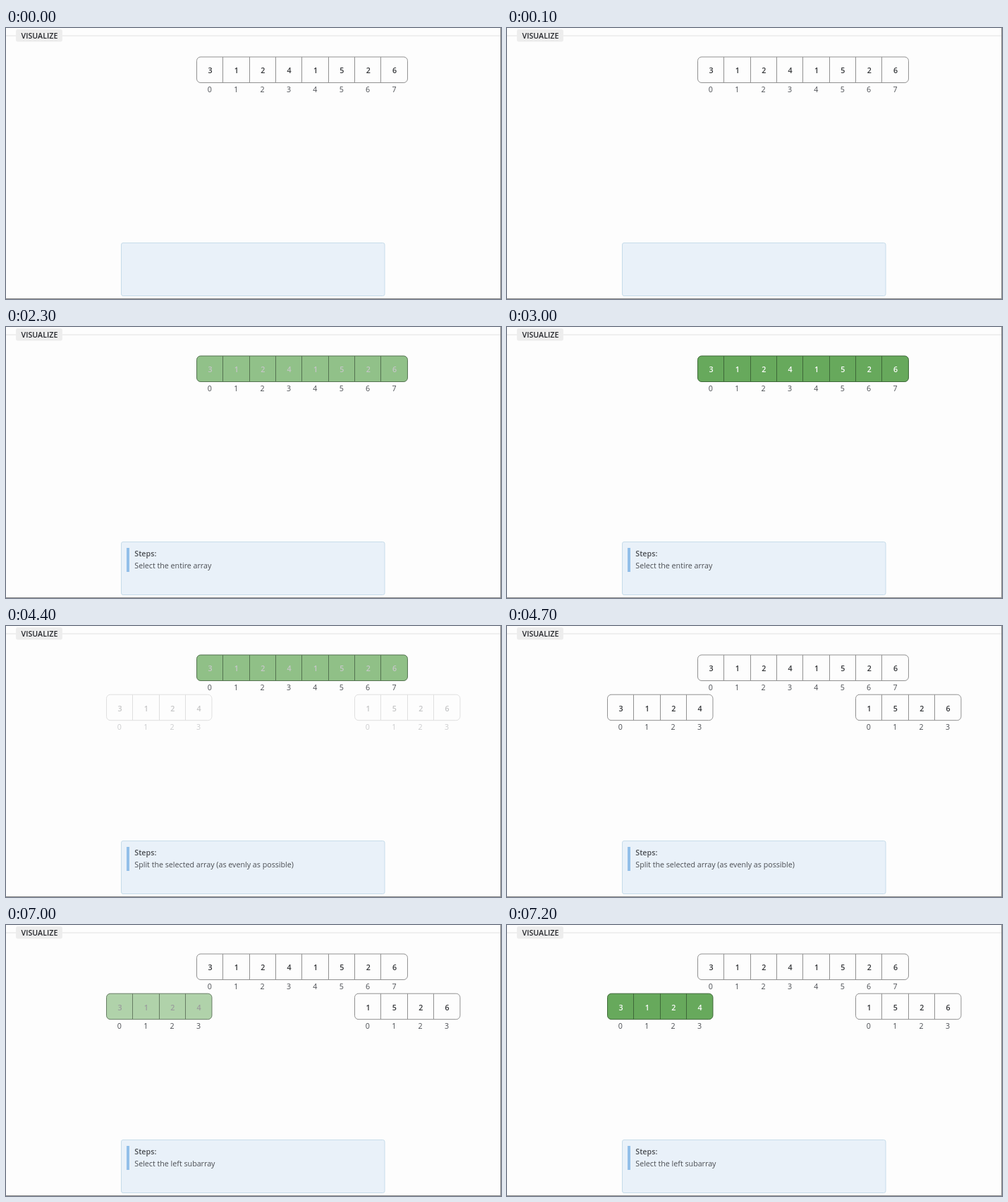
Recreate the animation shown at these times as an HTML page. Size 702 px wide and 384 px high, loop 8000 ms.

```html
<!DOCTYPE html>
<html lang="en">
<head>
<meta charset="utf-8">
<style>
  html, body { margin: 0; width: 100%; height: 100%; overflow: hidden; background: #fdfdfd; }
  svg { display: block; }
  text { font: 10.7px "Open Sans", "Noto Sans", sans-serif; fill: #4a4d52; }
  .bold { font-weight: 600; }
  .cells text { font-weight: 600; text-anchor: middle; }
  .index text { text-anchor: middle; }
</style>
</head>
<body>
<svg width="702" height="384" viewBox="0 0 702 384">
  <path d="M0 11H702" stroke="#e2e2e2"/>
  <rect x="14" y="2" width="66" height="17.5" rx="3" fill="#ededed"/>
  <text class="bold" x="21.5" y="14.6" style="fill:#24262b">VISUALIZE</text>
  <path d="M701.5 0V384M0 383.5H702" stroke="#8c8c8c"/>
  <rect x="163.5" y="304.5" width="373.5" height="75" rx="2.5" fill="#e9f1f9" stroke="#c6dcea"/>
  <g id="steps">
    <rect x="171" y="313" width="4" height="34" fill="#92bfe9"/>
    <text class="bold" x="182.3" y="325.3">Steps:</text>
    <text id="message" x="182.3" y="342.2"></text>
  </g>
  <g id="arrays"></g>
</svg>
<script>
const LOOP = 8000, FADE = 400, CELL = 37.37;
const WHITE = [253, 253, 253], GREEN = [103, 169, 92];
const EDGE = [145, 145, 145], GREEN_EDGE = [62, 104, 56];
const INK = [51, 53, 56];
const byId = id => document.getElementById(id);

function add(parent, name, attrs, text = "") {
  const el = document.createElementNS("http://www.w3.org/2000/svg", name);
  for (const key in attrs) el.setAttribute(key, attrs[key]);
  el.textContent = text;
  return parent.appendChild(el);
}

function makeArray(x, y, digits) {
  const group = add(byId("arrays"), "g", {});
  const cells = add(group, "g", { class: "cells" });
  const index = add(group, "g", { class: "index" });
  const box = add(cells, "rect", { x, y, width: CELL * digits.length, height: 36.5, rx: 5.5 });
  let lines = "";
  [...digits].forEach((digit, i) => {
    const mid = x + CELL * (i + 0.5);
    if (i) lines += `M${Math.floor(x + CELL * i - 0.2) + 0.5} ${y}v36.5`;
    add(cells, "text", { x: mid + 0.3, y: y + 23.4 }, digit);
    add(index, "text", { x: mid - 0.3, y: y + 50.2 }, i);
  });
  const rules = add(cells, "path", { d: lines });
  return { group, cells, box, rules };
}

const whole = makeArray(270.5, 41, "31241526");
const left = makeArray(142.5, 97.2, "3124");
const right = makeArray(494.5, 97.2, "1526");

const mix = (a, b, p) => `rgb(${a.map((v, i) => Math.round(v + (b[i] - v) * p))})`;
const ramp = (t, start) => Math.min(1, Math.max(0, (t - start) / FADE));

function paint(array, selected, opacity) {
  const edge = mix(EDGE, GREEN_EDGE, selected);
  array.group.setAttribute("opacity", opacity);
  array.box.setAttribute("fill", mix(WHITE, GREEN, selected));
  array.box.setAttribute("stroke", edge);
  array.rules.setAttribute("stroke", edge);
  for (const digit of array.cells.querySelectorAll("text"))
    digit.style.fill = mix(INK, WHITE, selected);
}

function draw(now) {
  const t = Math.floor(now % LOOP / 100) * 100;
  const split = ramp(t, 4292);
  paint(whole, ramp(t, 2012) - split, 1);
  paint(left, ramp(t, 6795), split);
  paint(right, 0, split);
  byId("steps").setAttribute("visibility", t < 2100 ? "hidden" : "visible");
  byId("message").textContent =
    t < 4400 ? "Select the entire array" :
    t < 6900 ? "Split the selected array (as evenly as possible)" :
    "Select the left subarray";
}

let start;
function tick(now) {
  start ??= now;
  draw(now - start);
  requestAnimationFrame(tick);
}
draw(0);
requestAnimationFrame(tick);
</script>
</body>
</html>
```
